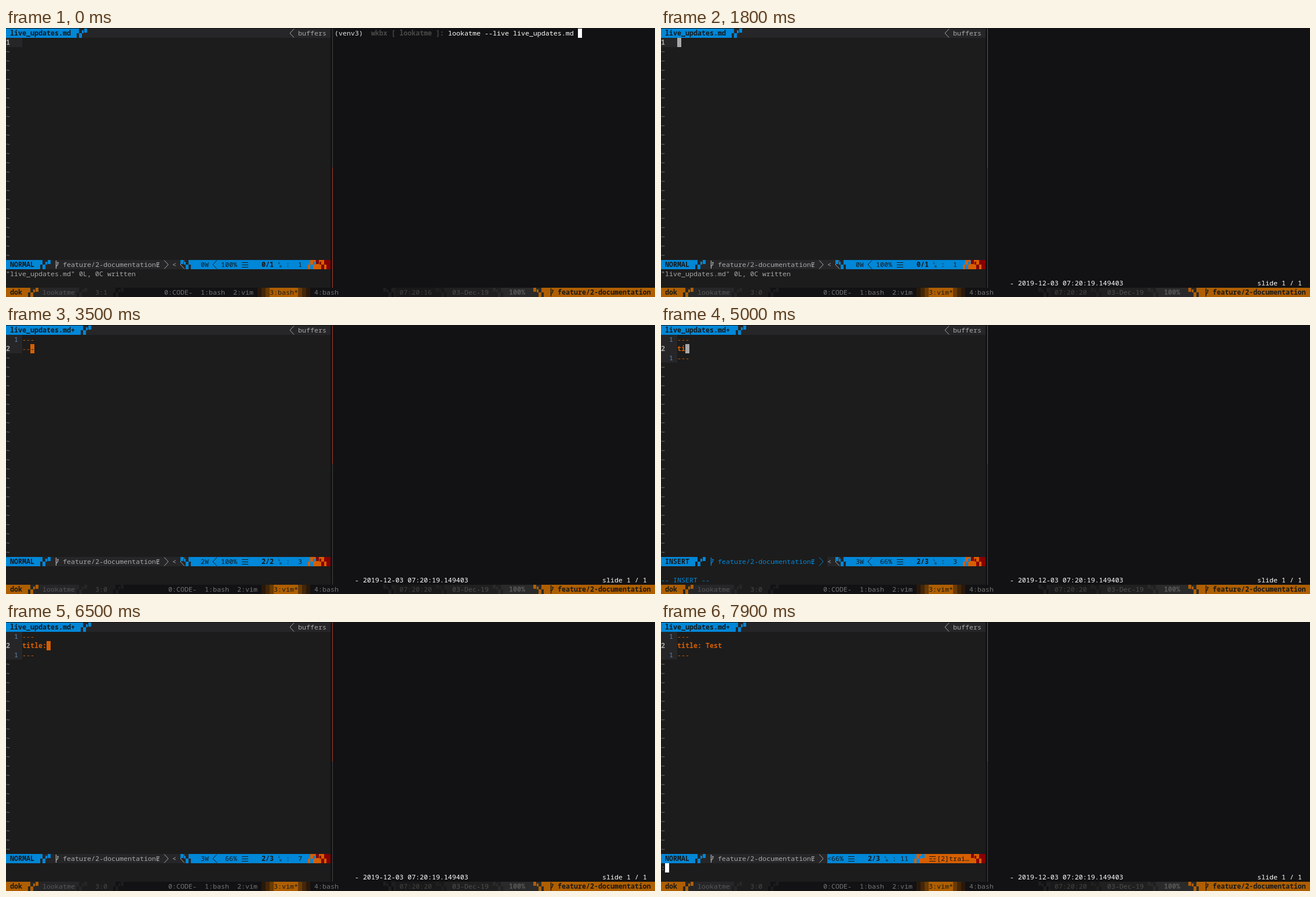
Animation, 1120 px wide and 465 px high, one loop 8000 ms. Source, as an HTML page with a canvas:

```html
<!DOCTYPE html>
<html lang="en">
<head>
<meta charset="utf-8">
<title>Live updates</title>
<style>
html, body { margin: 0; width: 100%; height: 100%; overflow: hidden; background: #121113; }
canvas { display: block; }
</style>
</head>
<body>
<canvas id="stage" width="1120" height="465"></canvas>
<script>
const ctx = document.getElementById('stage').getContext('2d');
const W = 7, H = 16, LOOP = 8000;
const BACK = '#121113', EDIT = '#1c1c1c', BAR = '#262628', BLUE = '#0087d7', ORANGE = '#d75f00',
  AMBER = '#af5f00', RED = '#870000', GREY = '#a8a8a8', DIM = '#585858', INK = '#17181a';
const BRANCH = 'feature/2-documentation';

// Timeline: each entry changes part of the state from its time on.
const log = [
  [0, { cmd: 0, left: 0, clock: 16, win: 'bash', mode: 'NORMAL', hot: 0, msg: '"live_updates.md" 0L, 0C written',
    lines: [''], num: 0, row: 0, x: 0, cursor: GREY, words: 0, at: '0/1', col: 1, warn: 0, ask: 0 }],
  [600, { cmd: 1 }],
  [900, { cmd: 2 }],
  [1400, { left: 1, clock: 19 }],
  [1500, { win: 'vim' }],
  [1800, { clock: 20 }],
  [1900, { mode: 'INSERT', hot: 1, cursor: '#fff' }]
];
const add = (time, change) => log.push([time, change]);

function typeText(times, text, start, linesOf, extra) {
  times.forEach((time, i) => {
    const n = start + i;
    add(time, { lines: linesOf(text.slice(0, n)), x: n, col: n + 1, ...extra });
  });
}
const titled = s => ['---', s, '---'];

typeText([2200, 2400, 2500], '---', 1, s => [s], { at: '1/1', words: 1 });
add(2700, { lines: ['---', ''], row: 1, num: 1, x: 0, col: 1, at: '2/2' });
typeText([2900, 3100, 3200], '---', 1, s => ['---', s], { words: 2 });
add(3500, { mode: 'NORMAL', hot: 0, msg: '', x: 2, col: 3, cursor: ORANGE });
add(4600, { row: 0, num: 0, at: '1/2' });
add(4700, { mode: 'INSERT', hot: 1, lines: titled(''), row: 1, x: 0, cursor: GREY });
typeText([5000, 5100, 5300, 5400, 5600, 5800], 'title: ', 2, titled, { num: 1, at: '2/3', words: 3 });
add(6300, { mode: 'NORMAL', x: 6, cursor: ORANGE });
add(6500, { hot: 0, col: 7 });
add(6600, { mode: 'INSERT', hot: 1, x: 7, col: 8, cursor: GREY });
add(6700, { warn: 1 });
typeText([7000, 7100, 7200, 7300], 'title: Test', 8, titled);
add(7500, { mode: 'NORMAL', x: 10, cursor: ORANGE });
add(7600, { hot: 0, cursor: '' });
add(7900, { col: 11, ask: 1 });

const rowY = row => 1 + row * H;

function box(x, y, w, h, color) {
  ctx.fillStyle = color;
  ctx.fillRect(x, y, w, h);
}

// Fill a row between two pixel positions.
const band = (x0, x1, row, color) => box(x0, rowY(row), x1 - x0, H, color);

function put(text, x, row, color, bold) {
  ctx.font = (bold ? 'bold ' : '') + '11.667px "Noto Sans Mono", "DejaVu Sans Mono", monospace';
  ctx.fillStyle = color;
  ctx.fillText(text, x, rowY(row) + 12);
}

function path(points, color, width = 1) {
  ctx.strokeStyle = color;
  ctx.lineWidth = width;
  ctx.beginPath();
  points.forEach(([x, y]) => ctx.lineTo(x, y));
  ctx.stroke();
}

// Chevron pointing left (dir -1) or right (dir 1).
function chevron(x, row, dir, color) {
  const y = rowY(row), a = dir < 0 ? x + 7 : x, b = dir < 0 ? x : x + 7;
  path([[a, y + .5], [b, y + 8], [a, y + 15.5]], color);
}

// Blocks that scatter away from a segment's edge.
function scatter(x, row, color, dir = 1) {
  const parts = [[0, 0, 3, 16], [3, 0, 4, 8], [7, 8, 5, 8], [12, 3, 3, 5], [16, 0, 5, 7]];
  for (const [dx, dy, w, h] of parts) box(dir > 0 ? x + dx : x - dx - w, rowY(row) + dy, w, h, color);
}

// Three cells that darken away from a segment's edge.
function fade(x, row, dir) {
  ['#6a3b04', '#442708', '#29190c'].forEach((color, i) => {
    const left = dir > 0 ? x + i * W : x - (i + 1) * W;
    band(left, left + W, row, color);
  });
}

function branchIcon(x, row, color) {
  const y = rowY(row);
  path([[x + 2.5, y + 1], [x + 2.5, y + 15]], color, 1.4);
  path([[x + 2.5, y + 11], [x + 5.5, y + 8], [x + 5.5, y + 4]], color, 1.2);
  path([[x + 4, y + 5.5], [x + 5.5, y + 3.5], [x + 7, y + 5.5]], color);
}

function menuIcon(x, row, color, split) {
  for (let i = 0; i < 3; i++) box(x, rowY(row) + 4 + i * 4, 11, 1, color);
  if (split) box(x + 5, rowY(row) + 8, 2, 1, ORANGE);
}

function lineMark(x, row) {
  ctx.font = '6px "Noto Sans Mono", monospace';
  ctx.fillStyle = INK;
  ctx.fillText('L', x, rowY(row) + 7);
  ctx.fillText('N', x + 2, rowY(row) + 13);
}

function tabs(s) {
  const name = 'live_updates.md' + (s.at === '0/1' ? '' : '+'), end = (name.length + 2) * W;
  band(0, 560, 0, BAR);
  band(0, end, 0, BLUE);
  scatter(end, 0, BLUE);
  put(name, 7, 0, INK, true);
  chevron(490, 0, -1, GREY);
  put('buffers', 504, 0, GREY);
}

function buffer(s) {
  s.lines.forEach((text, i) => {
    const row = i + 1, here = i === s.num;
    const color = /^(---|t)/.test(text) ? ORANGE : '#8a8a8a';
    band(0, 28, row, BAR);
    put(here ? i + 1 : Math.abs(i - s.num), here ? 0 : 14, row, here ? GREY : '#5f87af', here);
    put(text, 28, row, color, text[0] === 't');
  });
  for (let row = s.lines.length + 1; row < 25; row++) put('~', 0, row, '#8a8a8a');
  if (s.left && s.cursor && !s.ask) {
    const x = 28 + s.x * W, row = s.row + 1;
    band(x, x + W, row, s.cursor);
    put(s.lines[s.row][s.x] || '', x, row, EDIT);
  }
}

function modeLine(s) {
  const row = 25, [n, m] = s.at.split('/'), shift = s.warn ? -84 : 0;
  const percent = n === '0' ? 100 : Math.floor(n / m * 100), tint = s.hot ? BLUE : GREY;
  band(0, 560, row, BAR);
  if (s.hot) band(56, 287, row, EDIT);
  band(0, 56, row, BLUE);
  scatter(56, row, BLUE);
  put(s.mode, 7, row, INK, true);
  branchIcon(84, row, tint);
  put(BRANCH + 'Ɇ', 98, row, tint);
  chevron(273, row, 1, tint);

  band(s.warn ? 287 : 322, 518 + shift, row, BLUE);
  put('<', 287, row, s.warn ? INK : GREY);
  if (!s.warn) {
    chevron(301, row, -1, GREY);
    scatter(322, row, BLUE, -1);
    put(s.words + 'W', 336, row, INK);
    chevron(357, row, -1, INK);
  }
  put(String(percent).padStart(3) + '%', 371 + shift, row, INK);
  menuIcon(407 + shift, row, INK);
  put(s.at, 441 + shift, row, INK, true);
  lineMark(470 + shift, row);
  put(':', 483 + shift, row, INK);
  put(String(s.col).padStart(2), 497 + shift, row, INK);

  band(518 + shift, 560, row, ORANGE);
  scatter(518 + shift, row, BLUE);
  band(553, 560, row, RED);
  scatter(556, row, RED, -1);
  if (s.warn) {
    menuIcon(463, row, INK, true);
    put('[2]trai…', 476, row, INK);
  }
}

function messages(s) {
  if (s.ask) {
    put(':', 0, 26, GREY);
    band(7, 14, 26, '#fff');
  } else put(s.msg, 0, 26, GREY);
  if (s.mode === 'INSERT') put('-- INSERT --', 0, 27, BLUE);
}

function shell(s) {
  if (s.cmd === 2) {
    put('- 2019-12-03 07:20:19.149403', 602, 27, '#fff');
    put('slide 1 / 1', 1029, 27, '#fff');
    return;
  }
  put('(venv3)', 567, 0, '#e4e4e4');
  put('wkbx [ lookatme ]:', 630, 0, '#4a4a4a', true);
  put('lookatme --live live_updates.md', 763, 0, '#fff');
  const x = s.cmd ? 567 : 987;
  band(x, x + W, s.cmd, '#fff');
}

function bottomBar(s) {
  const row = 28, shift = s.win === 'vim' ? 7 : 0;
  band(35, 119, row, BAR);
  band(119, 182, row, EDIT);
  band(0, 35, row, AMBER);
  scatter(35, row, AMBER);
  scatter(119, row, BAR);
  scatter(182, row, EDIT);
  put('dok', 7, row, INK, true);
  put('lookatme', 63, row, DIM);
  put('3:' + (s.left ? 0 : 1), 154, row, '#4a4a4a');

  put('0:CODE-', 273 + shift, row, '#767676');
  put('1:bash', 336 + shift, row, '#767676');
  put('2:vim', 392 + shift, row, '#767676');
  fade(455 + shift, row, -1);
  band(455 + shift, 504, row, AMBER);
  fade(504, row, 1);
  put('3:' + s.win + '*', 455 + shift, row, INK);
  put('4:bash', 532, row, '#767676');

  band(672, 763, row, '#19191a');
  band(763, 861, row, '#202021');
  band(861, 931, row, '#2a2a2b');
  scatter(672, row, '#1e1e1f', -1);
  scatter(763, row, '#202021', -1);
  scatter(861, row, '#2a2a2b', -1);
  band(931, 1120, row, AMBER);
  scatter(931, row, AMBER, -1);
  put('07:20:' + s.clock, 679, row, '#444');
  put('03-Dec-19', 770, row, '#505050');
  put('100%', 868, row, DIM, true);
  branchIcon(938, row, INK);
  put(BRANCH, 952, row, INK, true);
}

function draw(t) {
  const s = Object.assign({}, ...log.filter(([time]) => time <= t).map(e => e[1]));
  box(0, 0, 1120, 465, BACK);
  box(0, 1, 560, 448, EDIT);
  tabs(s);
  buffer(s);
  modeLine(s);
  messages(s);
  box(563, 1, 1, 240, s.left ? '#a5402d' : '#444');
  box(563, 241, 1, 208, s.left ? '#444' : '#a5402d');
  shell(s);
  bottomBar(s);
}

function tick() {
  draw(performance.now() % LOOP);
  requestAnimationFrame(tick);
}
tick();
</script>
</body>
</html>
```
